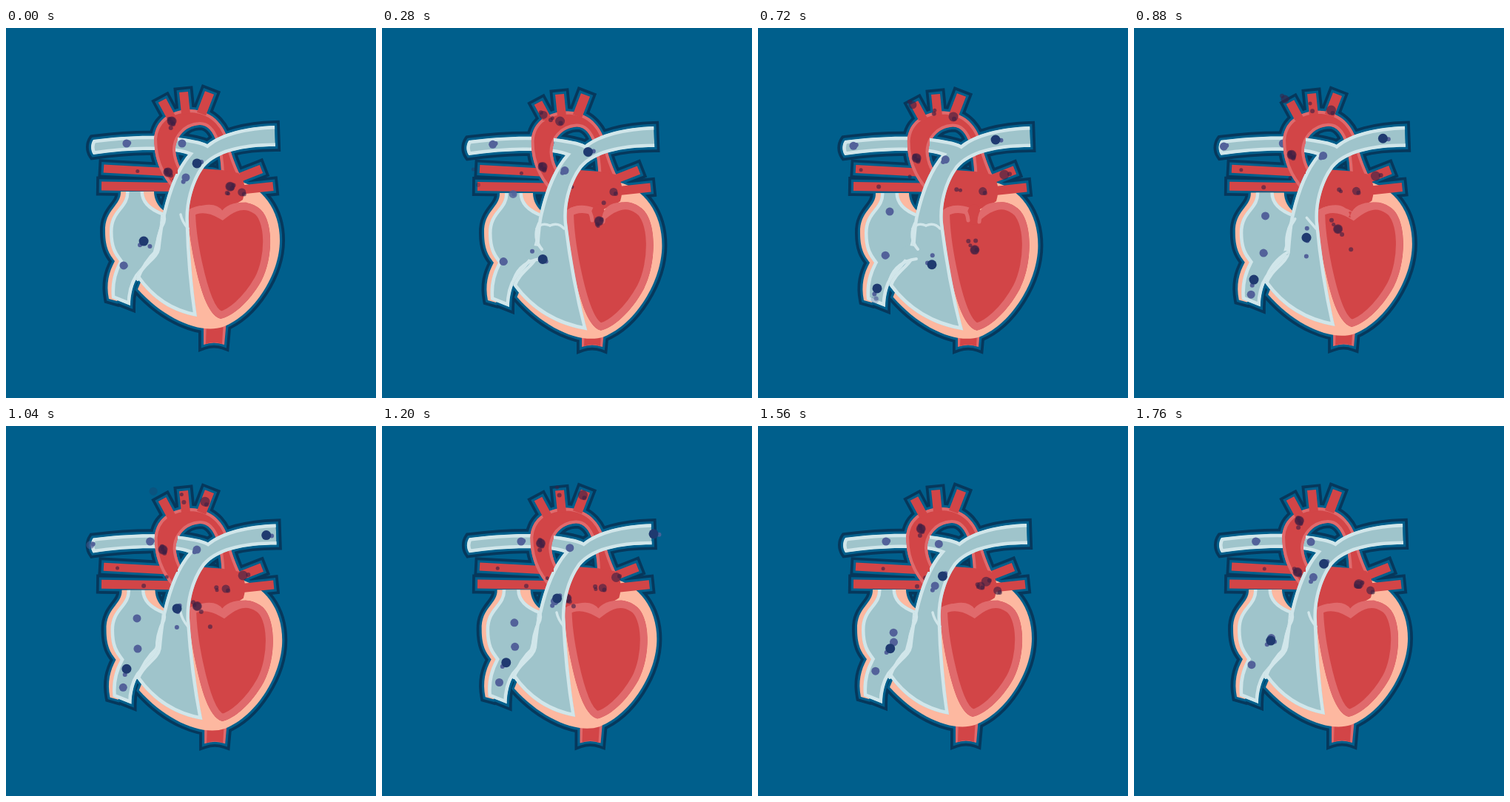
An HTML page with a canvas for the animation above (1800 ms loop, 500x500 px).

```html
<!DOCTYPE html>
<html lang="en">
<head>
<meta charset="utf-8">
<title>Beating heart</title>
<style>
html, body { margin: 0; width: 100%; height: 100%; overflow: hidden; background: #005f8c; }
canvas { display: block; width: 100vw; height: 100vh; }
</style>
</head>
<body>
<canvas id="stage" width="500" height="500"></canvas>
<script>
const ctx = document.getElementById('stage').getContext('2d');
const LOOP = 1800;
const BG = '#005f8c', NAVY = '#06385c', RED = '#d24547', ROSE = '#e06a6c',
  PEACH = '#fdb8a0', BLUE = '#9fc4cb', PALE = '#d1e6ea',
  PURPLE = '#53629a', INK = '#1f3a70', WINE = 'rgba(62,32,68,.62)';

const clamp = x => Math.max(0, Math.min(1, x));
const smooth = x => { x = clamp(x); return x * x * (3 - 2 * x); };
const mix = (a, b, u) => a + (b - a) * u;

// A contracted outline, and how far each of its points moves when relaxed
function pose(d, shift) {
  return e => new Path2D(d.replace(/([\d.]+) ([\d.]+)/g, (_, x, y) => {
    const [dx, dy] = shift(+x, +y);
    return (+x + dx * e).toFixed(2) + ' ' + (+y + dy * e).toFixed(2);
  }));
}
const nudge = (dx, dy) => () => [dx, dy];

// Straight vessel as a bar of the given width
function tube(x1, y1, x2, y2, w, shift) {
  const len = Math.hypot(x2 - x1, y2 - y1);
  const nx = (y1 - y2) / len * w / 2, ny = (x2 - x1) / len * w / 2;
  const corners = [[x1 + nx, y1 + ny], [x2 + nx, y2 + ny], [x2 - nx, y2 - ny], [x1 - nx, y1 - ny]];
  return pose('M' + corners.map(p => p.map(n => n.toFixed(2)).join(' ')).join('L') + 'Z', shift);
}

const body = pose(
  'M312 206C346 214 370 245 370 287C370 332 336 387 293 404C262 414 214 393 178 353L200 300L240 230Z',
  (x, y) => [6 + .02 * (x - 250), 2 + .055 * (y - 200)]);
const atriumWall = pose(
  'M155 221C156 240 133 245 134 275C134 300 142 308 147 315C139 330 135 345 139 366L150 369L176 340L210 290L214 247C206 242 200 232 200 221Z',
  nudge(4, 2));
const atrium = pose(
  'M162 221C163 242 140 245 140 275C140 300 148 308 153 315C145 330 141 345 143 365L168 375C168 360 172 345 178 336L202 308L212 270L214 250C200 245 186 236 186 221',
  nudge(4, 2));
const flow = pose(
  'M364 160C320 160 285 168 268 188C252 210 246 240 247 262C248 300 252 350 258 390C225 384 198 368 176 336C182 318 202 310 204 298C206 280 208 262 212 250C217 228 226 195 246 171C220 162 165 164 118 171C114 165 114 157 118 151C150 147 190 144 225 147C250 150 265 153 272 157C290 142 325 133 363 132',
  (x, y) => {
    const low = Math.max(0, y - 250) / 8;
    return [.02 * x - 3 + low * (x - 170) / 90, 1 + low];
  });
const aorta = pose(
  'M236 228C215 208 200 185 200 150C202 120 228 110 250 110C282 112 298 135 302 160C306 175 310 185 316 198L300 215L262 205ZM262 131C240 132 229 150 229 165C230 180 236 190 243 200L268 192C276 190 284 192 291 196C290 170 284 131 262 131Z',
  nudge(1.5, 2.5));
const chamber = pose(
  'M225 200L265 190L292 192L314 196C322 205 325 215 320 232C310 240 300 238 292 249C280 241 262 239 250 247L236 235Z',
  nudge(2, 2));
const ventricle = pose(
  'M246 246C262 236 278 240 292 248C305 238 322 230 340 242C362 255 362 310 345 342C328 372 305 390 290 393C272 388 262 350 255 318C249 290 246 265 246 246Z',
  (x, y) => [3 + .06 * (x - 246), .105 * (y - 242)]);
const tail = pose('M267 395L298 395L295 428Q281 423 267 428Z', nudge(3, 3));
const tailCore = pose('M271 395L294 395L292 427Q281 423 270 427Z', nudge(3, 3));
const veins = [
  tube(132, 190, 224, 195, 11, nudge(0, .5)),
  tube(129, 213.5, 224, 215, 12, nudge(0, .5)),
  tube(345, 190.5, 308, 205, 12, nudge(2, 1.5)),
  tube(361, 214, 314, 219, 12, nudge(2, 1.5))
];
const branches = [
  tube(211, 98, 224, 122, 12, nudge(0, 3)),
  tube(240, 86.5, 243, 116, 12, nudge(0, 3)),
  tube(275, 87.5, 264, 116, 13, nudge(0, 3))
];

// Valve flap: hinge, bend, and a tip that swings from shut to open
const flap = (hinge, bend, shut, open) => u =>
  new Path2D(`M${hinge}Q${bend},${mix(shut[0], open[0], u)},${mix(shut[1], open[1], u)}`);
const mitral = [
  flap([256, 245], [282, 236], [291, 249], [284, 260]),
  flap([324, 238], [300, 238], [293, 250], [299, 262])
];
const tricuspid = [
  flap([212, 264], [203, 284], [204, 300], [216, 299]),
  flap([178, 340], [186, 316], [204, 300], [214, 312])
];
const pulmonary = [
  flap([209, 271], [216, 262], [227, 267], [214, 254]),
  flap([246, 271], [238, 262], [227, 267], [236, 252])
];

function fill(path, color) {
  ctx.fillStyle = color;
  ctx.fill(path, 'evenodd');
}
function line(path, color, width) {
  ctx.strokeStyle = color;
  ctx.lineWidth = width;
  ctx.stroke(path);
}
// Fill with an edge drawn only on the inside; open ends get no edge
function lined(path, color, edge, width) {
  ctx.save();
  ctx.clip(path, 'evenodd');
  fill(path, color);
  line(path, edge, width * 2);
  ctx.restore();
}
function closed(path) {
  const p = new Path2D(path);
  p.closePath();
  return p;
}
function oval(x, y, rx, ry, color) {
  ctx.fillStyle = color;
  ctx.beginPath();
  ctx.ellipse(x, y, rx, ry, 0, 0, 7);
  ctx.fill();
}

// Routes are [beat, x, y]; every cell passes its ventricle during beat 0
const right = {
  lower: [[-.84, 153, 384], [-.6, 161, 352], [-.42, 163, 328]],
  slow: [[-1.6, 158, 367], [-1, 159, 321], [-.42, 178, 301]],
  upper: [[-.9, 177, 219], [-.6, 178, 248], [-.42, 177, 260]],
  heart: [[0, 186, 288], [.16, 218, 313], [.4, 235, 320], [.58, 231, 246]],
  toRight: [[1, 258, 183], [1.16, 279, 167], [1.4, 321, 151], [1.76, 383, 144]],
  toLeft: [[1, 243, 202], [1.58, 258, 167], [2, 238, 156], [3, 163, 156], [3.6, 112, 161]]
};
const left = {
  upper: [[-.84, 350, 193], [-.42, 320, 202]],
  lower: [[-1.3, 330, 223], [-.42, 297, 220]],
  farUpper: [[-2.84, 123, 189], [-2, 177, 191], [-.42, 285, 220]],
  farLower: [[-1.84, 128, 213], [-1.42, 185, 217], [-.42, 285, 220]],
  heart: [[0, 303, 214], [.16, 293, 262], [.4, 293, 300], [.58, 258, 243]],
  arch: [[1, 219, 195], [1.58, 212, 167], [2, 224, 126]],
  toLeft: [[2.4, 209, 104], [2.58, 199, 88]],
  toMid: [[2.4, 240, 112], [2.76, 237, 74]],
  toRight: [[2.16, 241, 126], [2.4, 264, 120], [2.76, 274, 84]]
};

let seed = 7;
const random = () => (seed = seed * 16807 % 2147483647) / 2147483647;
const jitter = n => (random() * 2 - 1) * n;
// Small cells stray a little from their route in place and time
function cell(color, r, ...legs) {
  const stray = r < 4 ? 1 : 0;
  return { color, r, way: legs.flat(), lag: jitter(.1) * stray, ox: jitter(3) * stray, oy: jitter(3) * stray };
}
const R = right, L = left;
const veinCells = [
  cell(PURPLE, 5.5, R.slow, R.heart, R.toLeft),
  cell(PURPLE, 5.5, R.upper, R.heart, R.toRight),
  cell(PURPLE, 3, R.slow, R.heart, R.toRight),
  cell(PURPLE, 3, R.upper, R.heart, R.toLeft),
  cell(PURPLE, 3, R.lower, R.heart, R.toLeft),
  cell(INK, 6.5, R.lower, R.heart, R.toRight)
];
const redCells = [
  cell(WINE, 6.5, L.upper, L.heart, L.arch, L.toRight),
  cell(WINE, 5.5, L.lower, L.heart, L.arch, L.toLeft),
  cell(WINE, 3, L.upper, L.heart, L.arch, L.toMid),
  cell(WINE, 3, L.lower, L.heart, L.arch, L.toRight),
  cell(WINE, 2.5, L.farUpper, L.heart, L.arch, L.toMid),
  cell(WINE, 3, L.farLower, L.heart, L.arch, L.toLeft)
];

function drawCells(list, t) {
  for (const { color, r, way, lag, ox, oy } of list) {
    const start = way[0][0], end = way[way.length - 1][0];
    const now = t / LOOP - lag;
    for (let b = now + Math.ceil(start - now); b <= end; b++) {
      const i = Math.max(1, way.findIndex(p => p[0] >= b));
      const [b0, x0, y0] = way[i - 1], [b1, x1, y1] = way[i];
      const u = (b - b0) / (b1 - b0);
      ctx.globalAlpha = clamp(.25 + Math.min(b - start, end - b) * 10);
      oval(mix(x0, x1, u) + ox, mix(y0, y1, u) + oy, r, r, color);
    }
  }
  ctx.globalAlpha = 1;
}

function draw(t) {
  const fall = clamp((t - 760) / 740);
  const e = t < 760 ? smooth(t / 250) : (1 - fall) ** 2;
  const v = t < 700 ? smooth(t / 220) : 1 - smooth((t - 740) / 220);
  const [main, wall, vein, lung, arch, stub] = [body, atriumWall, atrium, flow, aorta, tail].map(p => p(e));
  const side = veins.map(p => p(e)), top = branches.map(p => p(e));

  ctx.fillStyle = BG;
  ctx.fillRect(0, 0, 500, 500);
  ctx.lineCap = 'butt';
  ctx.lineJoin = 'miter';
  ctx.miterLimit = 3;
  const parts = [stub, main, wall, vein, lung, arch, ...side, ...top].map(closed);
  parts.forEach(p => line(p, NAVY, 14));
  parts.forEach(p => line(p, BG, 6.5));

  fill(stub, ROSE);
  fill(tailCore(e), RED);
  fill(main, PEACH);
  fill(wall, PEACH);
  side.forEach(p => fill(p, RED));
  lined(vein, BLUE, PALE, 4.5);
  lined(arch, RED, ROSE, 4);
  top.forEach(p => fill(p, RED));
  fill(chamber(e), RED);

  lined(ventricle(e), RED, ROSE, 10);
  oval(292, 252, 9 * v, 14 * v, RED);
  ctx.lineCap = 'round';
  mitral.forEach(m => line(m(v), ROSE, 5));
  drawCells(redCells, t);

  lined(lung, BLUE, PALE, 4.5);
  oval(205, 304, 13 * v, 10 * v, BLUE);
  tricuspid.forEach(m => line(m(v), PALE, 4));
  pulmonary.forEach(m => line(m(1 - v), PALE, 3.5));
  drawCells(veinCells, t);

  // The left limb of the arch crosses in front of the vessel
  ctx.save();
  ctx.beginPath();
  ctx.rect(196, 125, 36, 72);
  ctx.clip();
  ctx.clip(arch, 'evenodd');
  lined(arch, RED, ROSE, 4);
  drawCells(redCells, t);
  ctx.restore();
}

const t0 = performance.now();
function tick() {
  draw((performance.now() - t0) % LOOP);
  requestAnimationFrame(tick);
}
tick();
</script>
</body>
</html>
```
